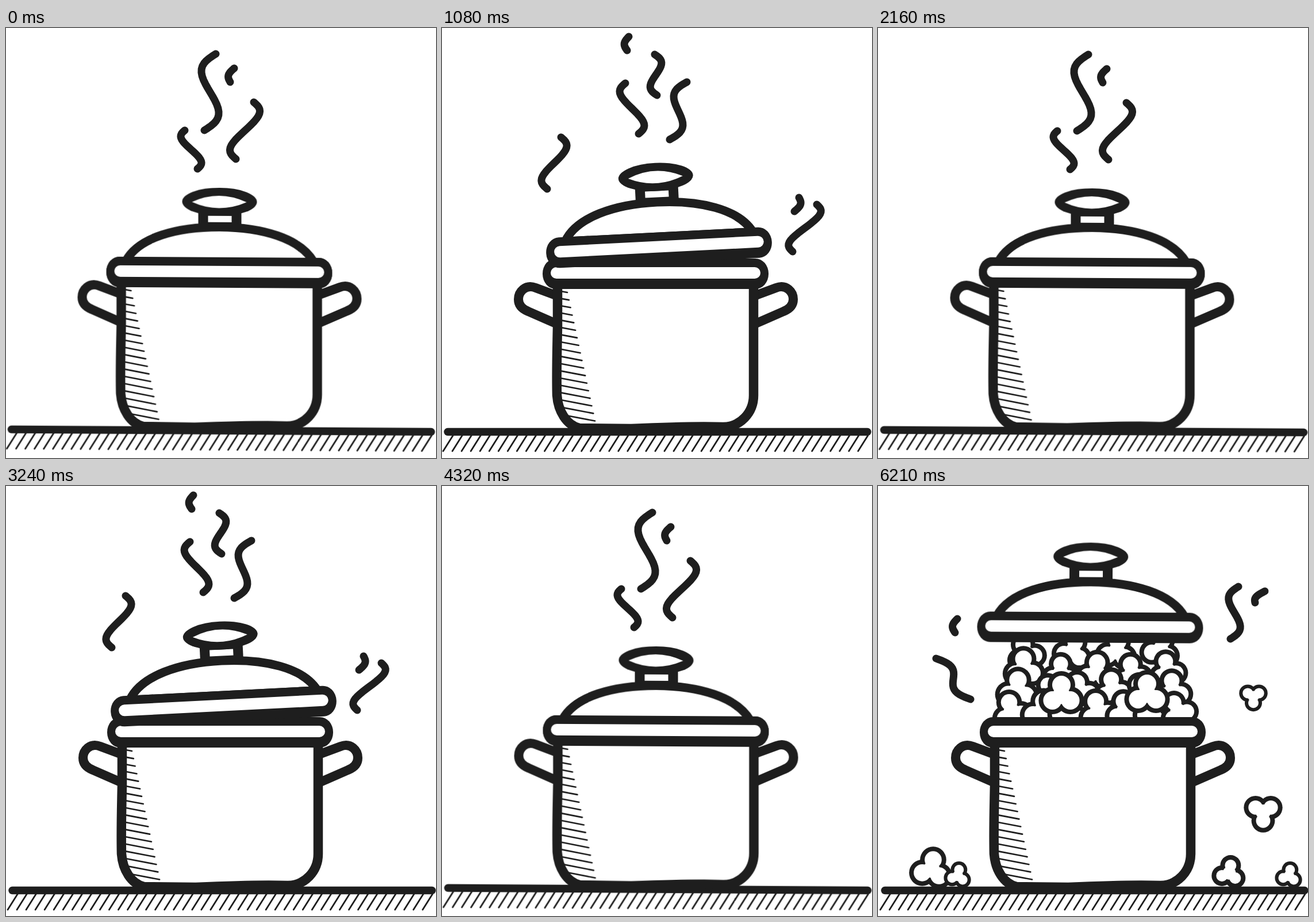
Write an HTML page that moves like this. It is 748 px wide and 748 px high and loops after 6480 ms.

```html
<!DOCTYPE html>
<html lang="en">
<head>
<meta charset="utf-8">
<title>Popcorn pot</title>
<style>
  html, body { margin: 0; width: 100%; height: 100%; overflow: hidden; background: #fff; }
  svg { display: block; width: 100vw; height: 100vh; }
  .line { fill: none; stroke: #1e1e1e; stroke-linecap: round; stroke-linejoin: round; }
  .ink { fill: #1e1e1e; }
  .paper { fill: #fff; }
  .steam { stroke-width: 13; }
  .pose { visibility: hidden; animation: show 2160ms step-end infinite; }
  #stage { animation: drift 6480ms step-end infinite; }
  @keyframes show { 0% { visibility: visible; } 12.5%, 100% { visibility: hidden; } }
  @keyframes drift { 0% { transform: translate(-1px, -1px); } 33.3333%, 100% { transform: none; } }
</style>
</head>
<body>
<svg viewBox="0 0 748 748">
  <defs>
    <clipPath id="aboveRim"><rect width="748" height="410"/></clipPath>

    <path id="handle" class="line" stroke-width="16" d="M199 466L164 453C146 446 134 460 134 473C134 484 141 490 151 494L199 515"/>
    <path id="body" d="M202 440V520C201 570 200 600 201 640C203 668 218 692 240 697L330 698Q440 693 490 695C520 695 543 670 543 640V440Z"/>

    <g id="rim">
      <rect class="ink" x="176" y="402" width="393" height="53" rx="23" ry="26"/>
      <rect class="paper" x="190" y="417" width="365" height="20" rx="10"/>
    </g>

    <g id="pot">
      <path class="line" stroke-width="13.5" d="M11 703.5H741"/>
      <path id="groundHatch" class="line" stroke-width="2.8"/>
      <use href="#handle"/>
      <use href="#handle" transform="matrix(-1 0 0 1 746 0)"/>
      <use href="#body" class="paper"/>
      <path id="bodyHatch" class="line" stroke-width="2.6"/>
      <use href="#body" class="line" stroke-width="16.5"/>
      <use href="#rim"/>
    </g>

    <g id="lid">
      <rect class="ink" x="336" y="322" width="75" height="28"/>
      <path class="line" stroke-width="15" style="fill:#fff" d="M210 409.5C232 368 300 349.5 373 349.5S514 368 537 409.5Z"/>
      <rect class="paper" x="353" y="330" width="41" height="11"/>
      <ellipse class="ink" cx="373" cy="305.5" rx="65" ry="24.5"/>
      <path class="paper" d="M325 306Q372 284 420 306Q372 327 325 306Z"/>
      <use href="#rim"/>
    </g>

    <g id="stack"></g>
  </defs>
  <g id="stage"></g>
</svg>
<script>
const byId = id => document.getElementById(id);
const range = (n, make) => Array.from({ length: n }, (_, i) => make(i)).join('');
const mix = (a, b, t) => a + (b - a) * t;
const use = (id, transform = '') => `<use href="#${id}" transform="${transform}"/>`;

let seed = 7;
const random = () => (seed = seed * 16807 % 2147483647) / 2147483647;

byId('groundHatch').setAttribute('d', range(46, i => `M${3 + 16.04 * i} 737l17 -27`));
byId('bodyHatch').setAttribute('d', range(18, i =>
  `M208 ${459 + 12.6 * i}L${219 + 2.83 * i} ${461 + 13.15 * i}`));

// A wisp sways once to each side; a short one is a single bow.
function wisp(x0, y0, x1, y1, side) {
  const length = Math.hypot(x1 - x0, y1 - y0);
  const short = length < 40;
  const sway = side * length * (short ? 0.26 : 0.155);
  const points = range(25, i => {
    const t = i / 24;
    const wave = Math.sin(Math.PI * t * (short ? 1 : 2));
    const along = short ? t : t - 0.05 * wave;
    return `${mix(x0, x1, along) + sway * wave},${mix(y0, y1, along)} `;
  });
  return `<polyline points="${points}"/>`;
}
const steam = (content, transform = '') => `<g class="line steam" transform="${transform}">${content}</g>`;

const calmSteam = wisp(366, 46, 346, 179, -1) + wisp(398, 71, 391, 95, -1) +
  wisp(432, 130, 401, 229, 1) + wisp(312, 179, 334, 246, -1);
const highSteam = wisp(326, 16, 323, 40, -1) + wisp(371, 47, 375, 118, 1) +
  wisp(320, 97, 343, 185, -1) + wisp(427, 95, 397, 195, -1);
const boilSteam = highSteam + wisp(208, 191, 184, 281, 1) +
  wisp(622, 296, 614, 320, 1) + wisp(653, 308, 611, 390, 1);
const burstSteam = wisp(138, 231, 134, 255, -1) + wisp(101, 300, 161, 371, 1) +
  wisp(627, 175, 613, 266, -1) + wisp(673, 183, 656, 203, -1);

// Three round lobes around a centre; turn is the angle of the first lobe.
function kernel(x, y, r, turn) {
  const edge = r < 27 ? 6 : 8;
  const lobes = (cls, radius) => range(3, i => {
    const a = (turn + 120 * i) * Math.PI / 180;
    return `<circle class="${cls}" cx="${x + r * 0.45 * Math.cos(a)}" cy="${y + r * 0.45 * Math.sin(a)}" r="${radius}"/>`;
  });
  return lobes('ink', r * 0.6) + lobes('paper', r * 0.6 - edge) +
    `<circle class="paper" cx="${x}" cy="${y}" r="${r * 0.38}"/>`;
}

// The heap widens towards the rim, with two big kernels in front.
byId('stack').innerHTML =
  '<path class="line paper" stroke-width="7" style="fill:#fff" d="M245 262H495L545 410H205Z"/>' +
  range(4, row => range(4 + row, i => kernel(
    mix(260 - 9 * row, 488 + 12 * row, i / (3 + row)) + 8 * (random() - 0.5),
    287 + 35 * row + 10 * (random() - 0.5), 34 + 5 * random(), -90 + 60 * (random() - 0.5)))) +
  kernel(318, 364, 40, -90) + kernel(467, 362, 40, -90);

// Where the loose kernels end up: four on the ground, two still in the air.
const landed = (x, r) => ({ x, y: 697 - 0.79 * r, r, turn: -80 });
const flying = (x, y, r) => ({ x, y, r, turn: 90 });
const loose = [landed(92, 38), landed(138, 24), landed(610, 30), landed(714, 24),
  flying(652, 366, 25), flying(669, 567, 34)];

const k = 0.0058;
const leanLeft = `matrix(1 ${k} 0 1 -0.5 ${-748 * k})`;
const leanRight = `matrix(1 ${-k} 0 1 0 0.5)`;
const mirror = 'matrix(-1 0 0 1 748 0)';
const lidAt = (dx, dy, turn) => use('lid', `translate(${dx} ${dy}) rotate(${turn} 372.5 428.5)`);

const closed = (lean, vapour) => `${vapour}<g transform="${lean}">${use('pot')}${use('lid')}</g>`;
const rattle = (side, vapour) => vapour + use('pot') + lidAt(6 * side, -45.5, -2.9 * side);

// Popcorn pushes the lid up with an ease-out while loose kernels fly out and drop.
function burst(u) {
  const top = 182.5;
  const lift = top * (1 - (1 - u) ** 1.7);
  const spread = 0.8 + 0.2 * u + 0.6 * u * (1 - u);
  const spill = loose.map(({ x, y, r, turn }) =>
    kernel(mix(372, x, spread), mix(300, y, u * u * 0.5 + u * 0.5), r, turn + 150 * (1 - u))).join('');
  return steam(burstSteam, `translate(0 ${40 * (1 - u)})`) +
    `<g transform="translate(1 0)">
      <g clip-path="url(#aboveRim)">${use('stack', `translate(0 ${top - lift})`)}</g>
      ${use('pot')}${lidAt(-4.5 * u, -lift, 0.35 * u)}${spill}
    </g>`;
}

const poses = [
  closed(leanLeft, steam(calmSteam)),
  closed(leanRight, steam(highSteam, mirror + 'translate(0 2)')),
  closed(leanLeft, steam(highSteam)),
  rattle(-1, steam(boilSteam, mirror)),
  rattle(1, steam(boilSteam)),
  burst(1 / 3),
  burst(2 / 3),
  burst(1)
];

byId('stage').innerHTML = poses.map((content, i) =>
  `<g class="pose" style="animation-delay:${270 * i - 2160}ms">${content}</g>`).join('');
</script>
</body>
</html>
```
